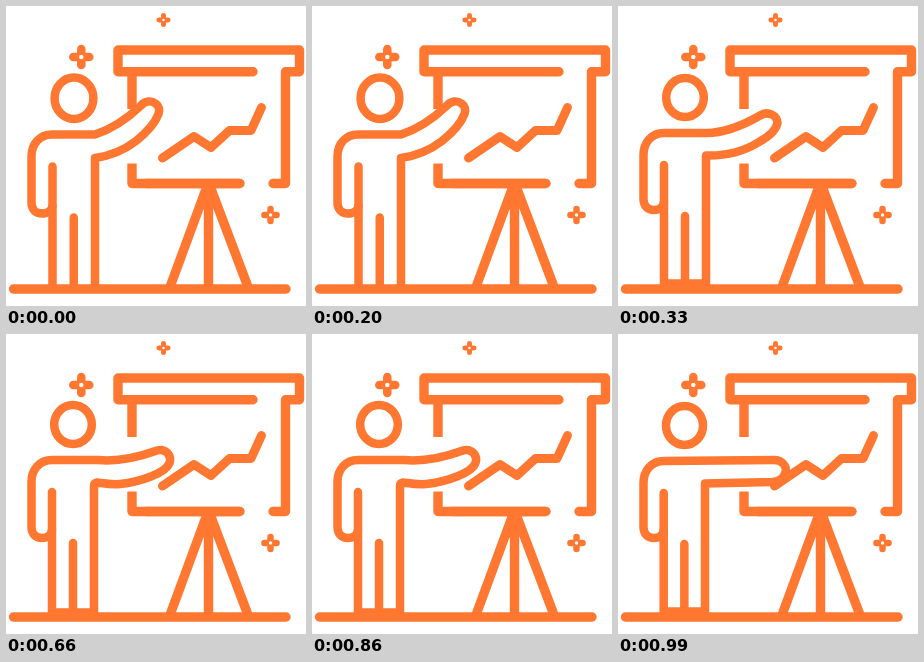
Animation, 300 px wide and 300 px high, one loop 1320 ms. Source, as an HTML page:

```html
<!DOCTYPE html>
<html lang="en">
<head>
<meta charset="utf-8">
<title>Presenter</title>
<style>
  html, body { margin: 0; width: 100%; height: 100%; overflow: hidden; background: #fff; }
  svg { display: block; width: 100vw; height: 100vh; }
  .line { fill: none; stroke: #ff7730; stroke-width: 9.4; stroke-linecap: round; stroke-linejoin: round; }
  .flat { stroke-linecap: butt; }
  .person { stroke-width: 8.5; }
</style>
</head>
<body>
<svg viewBox="0 0 300 300">
  <defs>
    <g id="spark">
      <path d="M-8 0H8M0-8V8" class="line" style="stroke-width:8.5"/>
      <circle r="2.2" fill="#fff"/>
    </g>
  </defs>
  <use href="#spark" transform="translate(75.3 51)"/>
  <use href="#spark" transform="translate(157.5 14) scale(.58)"/>
  <use href="#spark" transform="translate(264.5 209) scale(.76)"/>
  <g class="line">
    <path d="M247 65.8H112V44H293.5V65.8H279.5V177.5H267"/>
    <path d="M126 157.5V177.5H234" class="flat"/>
    <path d="M140 177.5H234"/>
    <path d="M126 68V103" class="flat"/>
    <path d="M156.5 152L188 130.5L205 141.5L223.5 124.5H245L255.5 101.5" style="stroke-width:9"/>
    <path d="M202.5 179V281M201.5 179L164 281M203.5 179L242 281" class="flat"/>
    <g class="person">
      <ellipse id="head"/>
      <path id="body" class="flat"/>
      <path id="legs"/>
      <path id="feet" class="flat"/>
    </g>
    <path d="M7.5 283H280"/>
  </g>
</svg>
<script>
const STEP = 330;

// Each pose: head ellipse, left and right leg x, shoulder y, hanging hand y, sole y, arm outline
const poses = [
  { head: [68, 92.3, 19.4, 20.7], left: 46.5, right: 89, top: 128.5, hand: 207.5, sole: 0,
    arm: 'H89C106 123 122 112 135 99.5C139 95 145 94 149.5 97.5C153 100 154 104 152.5 108C149 117 140 127 130 135C117 145 103 150 89 152' },
  { head: [67, 91.5, 18.8, 19.5], left: 46, right: 88, top: 127, hand: 204, sole: 277.5,
    arm: 'H88C107 127 124 120 143 109C150 105 159 109 159.5 117C158 125 150 131 141 136C125 146 107 150 88 149.5' },
  { head: [67, 90.5, 18.8, 19.5], left: 46, right: 88, top: 126, hand: 204, sole: 278.5,
    arm: 'H92C113 128 133 123 151 116.5C159 114 166 121 163.5 129C160 139 134 148 114 150C104 151 96 149 91 148.5Q88 149 88 152' },
  { head: [66.5, 91.5, 18.5, 19.4], left: 45.7, right: 87, top: 127, hand: 204, sole: 277.5,
    arm: 'L156 126C164 126 169 132 167.5 138C166 144 161 147.5 154 148L87 149.5' }
];

const [head, body, legs, feet] = ['head', 'body', 'legs', 'feet'].map(id => document.getElementById(id));

function show({ head: ellipse, left, right, top, hand, sole, arm }) {
  ['cx', 'cy', 'rx', 'ry'].forEach((key, i) => head.setAttribute(key, ellipse[i]));
  body.setAttribute('d',
    `M${left} ${hand - 9}C${left} ${hand - 3} 41 ${hand} 36 ${hand}` +
    `C30 ${hand} 25.5 ${hand - 4} 25.5 ${hand - 11}V${top + 22}` +
    `C25.5 ${top + 9} 34 ${top} 46 ${top}${arm}V281`);
  const mid = (left + right) / 2;
  legs.setAttribute('d', `M${left} ${top + 32}V281M${mid} ${top + 83}V281`);
  feet.setAttribute('d', sole ? `M${left} ${sole}H${right}` : '');
}

function tick() {
  show(poses[Math.floor(performance.now() / STEP) % poses.length]);
  requestAnimationFrame(tick);
}
tick();
</script>
</body>
</html>
```
